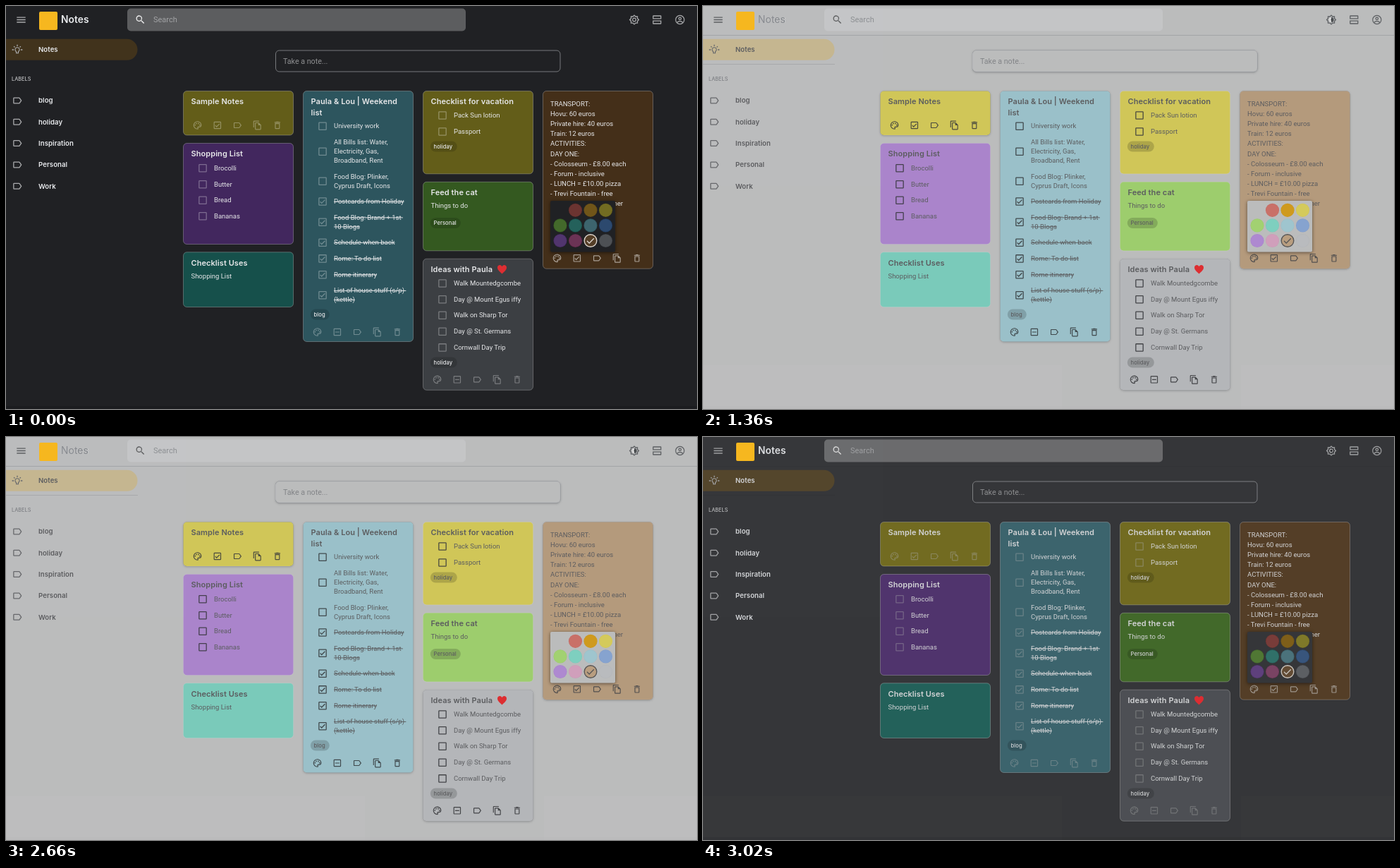
Write an HTML page that moves like this. It is 980x571 px and loops after 3.08 s.

```html
<!DOCTYPE html>
<html lang="en">
<head>
<meta charset="utf-8">
<title>Notes theme fade</title>
<style>
  html, body { margin: 0; width: 100%; height: 100%; overflow: hidden; background: #202124; }
  svg { position: absolute; left: 0; top: 0; width: 980px; height: 571px; }
  text { white-space: pre; font-family: Roboto, Arial, sans-serif; }
  .wide { font-family: Inter, "Open Sans", sans-serif; }
  .done { text-decoration: line-through; }
  .lifted { filter: drop-shadow(0 .7px .7px rgba(60,64,67,.55)) drop-shadow(0 1px 1.5px rgba(60,64,67,.3)); }
  .popup { filter: drop-shadow(0 1.5px 2.5px rgba(0,0,0,.5)); }
</style>
</head>
<body>
<script>
const DARK = {
  page: '#202124', text: '#e6e7e9', brand: '#e8eaed', nav: '#e8eaed', navIcon: '#abacae', bar: '#a9aaac',
  active: '#41331c', search: '#5c5d5f', searchText: '#a2a3a5', searchIcon: '#f0f0f0',
  hint: '#8f9092', caption: '#c3c4c6', edge: '#77797c', cardEdge: 'rgba(255,255,255,.26)',
  icon: 'rgba(255,255,255,.32)', iconLit: 'rgba(255,255,255,.55)', chip: 'rgba(0,0,0,.15)', ring: '#dcd6cf',
  red: '#5c2b29', orange: '#614a19', yellow: '#635d19', green: '#345920', teal: '#16504b', cyan: '#2d555e',
  blue: '#1e3a5f', purple: '#42275e', pink: '#5b2245', brown: '#442f19', gray: '#3c3f43'
};
const LIGHT = {
  light: true,
  page: '#ffffff', text: '#202124', brand: '#5f6368', nav: '#202124', navIcon: '#4a4c50', bar: '#3c4043',
  active: '#feefc3', search: '#f1f3f4', searchText: '#85888c', searchIcon: '#202124',
  hint: '#7d8083', caption: '#5f6368', edge: '#d0d2d4', cardEdge: 'rgba(0,0,0,.05)',
  icon: '#2c2d30', iconLit: '#2c2d30', chip: 'rgba(0,0,0,.17)', ring: '#202124',
  red: '#f28b82', orange: '#f8b922', yellow: '#fff475', green: '#ccff90', teal: '#a7ffeb', cyan: '#cbf0f8',
  blue: '#aecbfa', purple: '#d7aefb', pink: '#fdcfe8', brown: '#e6c9a8', gray: '#e8eaed'
};

const BOX = 'M19 3H5a2 2 0 0 0-2 2v14a2 2 0 0 0 2 2h14a2 2 0 0 0 2-2V5a2 2 0 0 0-2-2zM5 5h14v14H5z';
const TICK = 'M18 9l-1.4-1.4-6.6 6.6-2.6-2.6L6 13l4 4z';
const dot = (x, y, r) => `M${x - r} ${y}a${r} ${r} 0 1 0 ${2 * r} 0a${r} ${r} 0 1 0 ${-2 * r} 0z`;
const SUN = 'M20 8.7V4h-4.7L12 .7 8.7 4H4v4.7L.7 12 4 15.3V20h4.7l3.3 3.3 3.3-3.3H20v-4.7l3.3-3.3zM18 14.5V18h-3.5L12 20.500 9.500 18H6v-3.500L3.500 12 6 9.500V6h3.500L12 3.500 14.500 6H18v3.500l2.500 2.500z';
const ICONS = {
  box: BOX,
  ticked: BOX + TICK,
  minus: BOX + 'M7 11h10v2H7z',
  palette: 'M12 2a10 10 0 0 0 0 20 2.500 2.500 0 0 0 1.900-4.200.5.5 0 0 1 .300-.800H16a6 6 0 0 0 6-6c0-5-4.500-9-10-9zM16 15h-1.800a2.500 2.500 0 0 0-1.900 4.200.5.5 0 0 1-.300.800 8 8 0 0 1 0-16c4.400 0 8 3.100 8 7a4 4 0 0 1-4 4z'
    + dot(6.5, 11.5, 1.5) + dot(9.5, 7.5, 1.5) + dot(14.5, 7.5, 1.5) + dot(17.5, 11.5, 1.5),
  label: 'M17.600 5.800A2 2 0 0 0 16 5H5a2 2 0 0 0-2 2v10a2 2 0 0 0 2 2h11a2 2 0 0 0 1.600-.800L22 12zM16 17H5V7h11l3.500 5z',
  copy: 'M16 1H4a2 2 0 0 0-2 2v14h2V3h12zM15 5H8a2 2 0 0 0-2 2v14a2 2 0 0 0 2 2h11a2 2 0 0 0 2-2V11zM8 21V7h6v5h5v9z',
  trash: 'M6 19a2 2 0 0 0 2 2h8a2 2 0 0 0 2-2V7H6zM8 9h8v10H8zM15.500 4l-1-1h-5l-1 1H5v2h14V4z',
  menu: 'M3 6h18v2H3zM3 11h18v2H3zM3 16h18v2H3z',
  search: 'M15.500 14h-.800l-.300-.300a6.500 6.500 0 1 0-.700.700l.300.300v.800l5 5 1.500-1.500zM9.500 14a4.500 4.500 0 1 1 0-9 4.500 4.500 0 0 1 0 9z',
  sun: SUN + dot(12, 12, 4.500) + dot(12, 12, 2.700),
  halfSun: SUN + 'M12 6.500v11a5.500 5.500 0 0 0 0-11z',
  rows: 'M4 2.500h16a1.500 1.500 0 0 1 1.500 1.500v6.500h-19V4A1.500 1.500 0 0 1 4 2.500zM4.500 4.500v4h15v-4zM2.500 13.500h19V20a1.500 1.500 0 0 1-1.500 1.500H4A1.500 1.500 0 0 1 2.500 20zM4.500 15.500v4h15v-4z',
  user: dot(12, 12, 10) + dot(12, 12, 8.200) + dot(12, 9.500, 3.500) + dot(12, 9.500, 1.700) + 'M5.500 17c3-3.600 10-3.600 13 0l-1.200 1.400c-2.600-3-8-3-10.600 0z',
  bulb: 'M9 20v-3.600a5.500 5.500 0 1 1 6 0V20zM10.700 18.200h2.600v-2.800a3.800 3.800 0 1 0-2.600 0zM11 1h2v3.500h-2zM1 11h3.500v2H1zM19.500 11H23v2h-3.500zM4 5.400L5.400 4l2 2L6 7.400zM20 5.400L18.600 4l-2 2L18 7.400z'
};

const rect = (x, y, w, h, r, fill, extra = '') =>
  `<rect x="${x}" y="${y}" width="${w}" height="${h}" rx="${r}" fill="${fill}" ${extra}/>`;
const icon = (name, cx, cy, size, fill) =>
  `<path d="${ICONS[name]}" fill="${fill}" fill-rule="evenodd" transform="translate(${cx - size / 2} ${cy - size / 2}) scale(${size / 24})"/>`;
// cy is the middle of the capitals
const text = (str, x, cy, size, fill, extra = '') =>
  `<text x="${x}" y="${cy + size * .36}" font-size="${size}" fill="${fill}" ${extra}>${str.replace(/&/g, '&amp;')}</text>`;
const wide = (str, x, cy, size, fill, weight = 600) =>
  text(str, x, cy, size, fill, `class="wide" font-weight="${weight}" letter-spacing=".07"`);

// items: [first line centre, lines, done]
const CARDS = [
  { x: 251.5, y: 120.5, h: 62.5, hue: 'yellow', title: ['Sample Notes'], tools: 169, second: 'ticked' },
  { x: 251.5, y: 194.5, h: 143, hue: 'purple', title: ['Shopping List'],
    items: [[229.5, ['Brocolli']], [252.5, ['Butter']], [275, ['Bread']], [297.5, ['Bananas']]] },
  { x: 251.5, y: 348.8, h: 77.7, hue: 'teal', title: ['Checklist Uses'], body: 'Shopping List' },
  { x: 421.5, y: 120.5, h: 355, hue: 'cyan', title: ['Paula & Lou | Weekend', 'list'], tools: 462, second: 'minus',
    chip: ['blog', 437, 27],
    items: [[170, ['University work']],
      [193, ['All Bills list: Water,', 'Electricity, Gas,', 'Broadband, Rent']],
      [241.5, ['Food Blog: Plinker,', 'Cyprus Draft, Icons']],
      [276.8, ['Postcards from Holiday'], 1],
      [299.5, ['Food Blog: Brand + 1st ', '10 Blogs'], 1],
      [335, ['Schedule when back'], 1], [357.7, ['Rome: To do list'], 1], [380.5, ['Rome itinerary'], 1],
      [403, ['List of house stuff (s/p) ', '(kettle)'], 1]] },
  { x: 591.5, y: 120.5, h: 117.3, hue: 'yellow', title: ['Checklist for vacation'], chip: ['holiday', 199, 38],
    items: [[154.8, ['Pack Sun lotion']], [177.8, ['Passport']]] },
  { x: 591.5, y: 249.3, h: 97.5, hue: 'green', title: ['Feed the cat'], body: 'Things to do', chip: ['Personal', 307.5, 43] },
  { x: 591.5, y: 358.2, h: 186, hue: 'gray', title: ['Ideas with Paula'], heart: true, tools: 529.3, second: 'minus',
    chip: ['holiday', 505, 38],
    items: [[392.8, ['Walk Mountedgcombe']], [415.5, ['Day @ Mount Egus iffy']], [438, ['Walk on Sharp Tor']],
      [461, ['Day @ St. Germans']], [483.7, ['Cornwall Day Trip']]] },
  { x: 761.5, y: 120.5, h: 251.7, hue: 'brown', tools: 357.3, second: 'ticked', lit: true,
    lines: ['TRANSPORT:', 'Hovu: 60 euros', 'Private hire: 40 euros', 'Train: 12 euros', 'ACTIVITIES:', 'DAY ONE:',
      '- Colosseum - £8.00 each', '- Forum - inclusive', '- LUNCH = £10.00 pizza', '- Trevi Fountain - free'] }
];

function card(c, t) {
  const left = c.x + 11, mark = c.x + 27.5, copy = c.x + 43.5, ink = c.lit ? t.iconLit : t.icon;
  let out = rect(c.x, c.y, 156, c.h, 5, t[c.hue],
    `stroke="${t.cardEdge}" ${t.light && c.tools ? 'class="lifted"' : ''}`);
  (c.title || []).forEach((s, i) => out += wide(s, left, c.y + 15 + i * 15.5, 11, t.text));
  if (c.heart) out += '<path d="M703.500 379.500C701 377 697 374.500 697 370.600c0-4.200 5-5 6.500-1.400 1.500-3.600 6.500-2.800 6.500 1.400 0 3.900-4 6.400-6.500 8.900z" fill="#dd2e32"/>';
  if (c.body) out += text(c.body, left, c.y + 33.7, 9.5, t.text);
  (c.lines || []).forEach((s, i) => out += text(s, left - .5, 138.3 + i * 14.17, 9.55, t.text));
  (c.items || []).forEach(([y, lines, done]) => {
    out += icon(done ? 'ticked' : 'box', mark, y + (lines.length - 1) * 6.5 + .2, 15.5, ink);
    lines.forEach((s, i) => out += text(s, copy, y + i * 13, 9.5, t.text, done ? 'class="done"' : ''));
  });
  if (c.chip) {
    const [s, y, w] = c.chip;
    out += rect(c.x + 10.3, y - 7.5, w, 15, 7.5, t.chip) + wide(s, c.x + 15, y, 7.6, t.text, 500);
  }
  if (c.tools) ['palette', c.second, 'label', 'copy', 'trash'].forEach((name, i) =>
    out += icon(name, c.x + 20 + i * 28.35, c.tools, 14, ink));
  return out;
}

function picker(t) {
  const hues = [, 'red', 'orange', 'yellow', 'green', 'teal', 'cyan', 'blue', 'purple', 'pink', 'brown', 'gray'];
  let out = rect(772, 276, 92, 72.5, 2, t.page, 'class="popup"');
  hues.forEach((hue, i) => {
    const x = 786 + i % 4 * 21.5, y = 289.3 + Math.floor(i / 4) * 21.6, on = hue === 'brown';
    out += `<circle cx="${x}" cy="${y}" r="${on ? 8.8 : 9.6}" fill="${t[hue]}" ${on ? `stroke="${t.ring}" stroke-width="1.4"` : ''}/>`;
    // swatches glow a little in the dark theme
    if (!t.light) out += `<circle cx="${x}" cy="${y}" r="9" fill="${LIGHT[hue]}" opacity=".1"/>`;
    if (on) out += `<path d="M${x - 5} ${y + .3}l3.200 3.200 6.600-6.800" fill="none" stroke="${t.ring}" stroke-width="1.300"/>`;
  });
  return out;
}

function scene(t) {
  let out = rect(0, 0, 980, 571, 0, t.page);
  if (t.light) out += rect(0, 41, 980, 1, 0, '#dcdee0') + rect(0, 82, 187, 1, 0, '#e3e4e6');
  else out += rect(0, 567, 980, 4, 0, '#1b1c1f');

  out += icon('menu', 21.5, 19.5, 16.5, t.bar) + rect(47, 8, 26, 26, 2, '#f6b71f')
    + wide('Notes', 78, 19.3, 13.8, t.brand, t.light ? 500 : 600)
    + rect(172, 3.5, 480, 32, 5, t.search) + icon('search', 190.5, 19.3, 16, t.searchIcon)
    + text('Search', 209, 19.3, 11, t.searchText)
    + icon(t.light ? 'halfSun' : 'sun', 891, 19.5, 15.5, t.bar)
    + icon('rows', 923.3, 19.5, 15.5, t.bar) + icon('user', 955.8, 19.5, 16, t.bar);

  out += `<path d="M0 46.800h171.500a15 15 0 0 1 0 30H0z" fill="${t.active}"/>`
    + icon('bulb', 16, 62, 16, t.navIcon) + wide('Notes', 46, 62, 9.6, t.nav)
    + wide('LABELS', 8, 103.3, 7.2, t.caption, 500);
  ['blog', 'holiday', 'Inspiration', 'Personal', 'Work'].forEach((s, i) => {
    const y = 134 + i * 30.3;
    out += icon('label', 16, y, 15.5, t.navIcon) + wide(s, 46, y, 9.6, t.nav);
  });

  out += rect(382.5, 63, 403.5, 30, 5, t.page, `stroke="${t.edge}" ${t.light ? 'class="lifted"' : ''}`)
    + text('Take a note...', 393, 78, 10.7, t.hint);
  CARDS.forEach(c => out += card(c, t));
  out += text('ner', 875, 280, 9.55, t.text, 'text-anchor="end"') + picker(t);
  return `<svg viewBox="0 0 980 571">${out}</svg>`;
}

document.body.insertAdjacentHTML('beforeend', scene(DARK) + scene(LIGHT));

// [time, opacity of the light theme, easing to the next key]
const LOOP = 3080, NINE = 'steps(9, jump-none)', HOLD = 'step-end';
const KEYS = [
  [0, 0, HOLD], [1000, .1, NINE], [1540, .9, HOLD], [1540, 1, HOLD],
  [2540, .9, NINE], [3080, .1, HOLD]
];
document.body.lastElementChild.animate(
  KEYS.map(([at, opacity, easing]) => ({ offset: at / LOOP, opacity, easing })),
  { duration: LOOP, iterations: Infinity }
);
</script>
</body>
</html>
```
